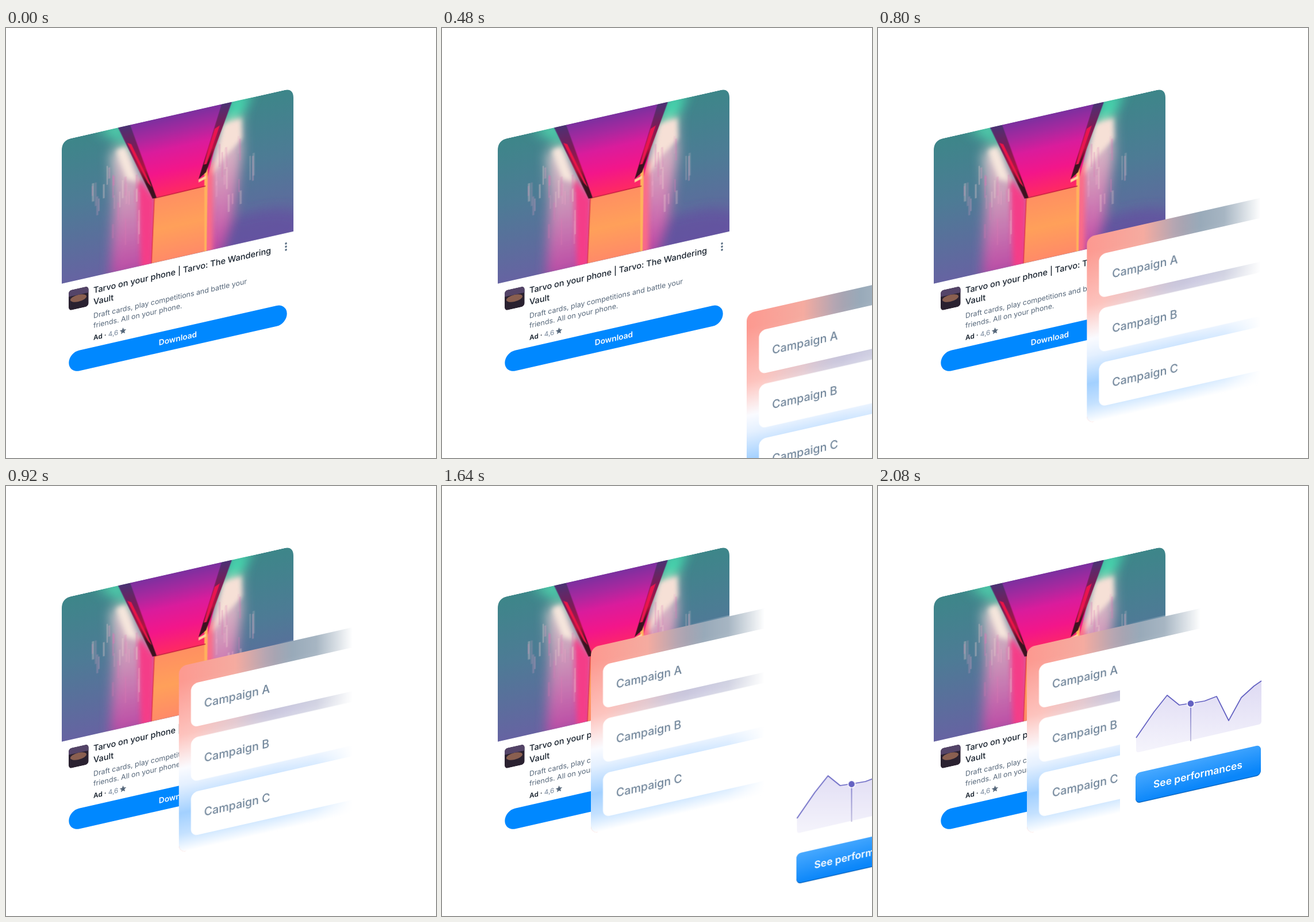
These frames come from a looping animation (748x748 px, 2600 ms). An HTML page:

```html
<!DOCTYPE html>
<html lang="en">
<head>
<meta charset="utf-8">
<title>Ad, campaigns, performance</title>
<style>
  html, body { margin: 0; width: 100%; height: 100%; overflow: hidden; background: #fff; }
  svg { display: block; width: 748px; height: 748px; }
  text { font-family: Inter, "Open Sans", sans-serif; }

  .slide { animation: 2600ms -3ms infinite; }
  .campaigns { animation-name: campaigns; }
  .report { animation-name: report; }

  /* Both layers glide in at constant speed, 25 positions per second */
  @keyframes campaigns {
    0% { transform: translate(900px, 715px); animation-timing-function: step-end; }
    3.0769% { transform: translate(480px, 381px); animation-timing-function: steps(23); }
    38.4615%, 100% { transform: translate(0, 0); }
  }
  @keyframes report {
    0% { transform: translate(900px, 750px); animation-timing-function: step-end; }
    50.7692% { transform: translate(291px, 242px); animation-timing-function: steps(19); }
    80%, 100% { transform: translate(0, 0); }
  }

  .title { font-size: 14.5px; font-weight: 500; fill: #16202c; }
  .copy { font-size: 12.4px; fill: #56677a; }
  .rating { font-size: 11.8px; fill: #74859a; }
  .cta { font-weight: 600; fill: #fff; text-anchor: middle; }
  .sheet { width: 328px; height: 324px; rx: 13px; }
  .row rect { width: 289px; height: 76px; rx: 12px; fill: #fff; }
  .row text { font-size: 19.6px; font-weight: 500; fill: #6f8499; }
</style>
</head>
<body>
<svg viewBox="0 0 748 748">
  <defs>
    <clipPath id="photoClip"><path d="M0 249.3V17Q0 0 17 0H386Q403 0 403 17V249.3Z"/></clipPath>
    <clipPath id="iconClip"><rect x="12" y="264" width="34.5" height="35" rx="5.5"/></clipPath>
    <filter id="soft" x="-50%" y="-50%" width="200%" height="200%"><feGaussianBlur stdDeviation="10"/></filter>
    <filter id="haze" x="-50%" y="-50%" width="200%" height="200%"><feGaussianBlur stdDeviation="4"/></filter>

    <linearGradient id="walls" x2="0" y2="1">
      <stop stop-color="#3d8689"/><stop offset=".45" stop-color="#4d7b95"/><stop offset="1" stop-color="#6663a2"/>
    </linearGradient>
    <linearGradient id="ceiling" x2="0" y2="1">
      <stop stop-color="#7c309f"/><stop offset=".22" stop-color="#aa289f"/>
      <stop offset=".42" stop-color="#da1c9c"/><stop offset=".7" stop-color="#f3168a"/><stop offset="1" stop-color="#ff2a62"/>
    </linearGradient>
    <linearGradient id="beam" x2="0" y2="1">
      <stop stop-color="#4b3274"/><stop offset=".3" stop-color="#7a1c58"/>
      <stop offset=".6" stop-color="#b01440"/><stop offset=".8" stop-color="#3c1220"/><stop offset="1" stop-color="#3c1220"/>
    </linearGradient>
    <linearGradient id="back" x2="0" y2="1">
      <stop stop-color="#ff8f62"/><stop offset=".5" stop-color="#ffa05a"/><stop offset="1" stop-color="#ff8a68"/>
    </linearGradient>
    <linearGradient id="glow" x2="0" y2="1">
      <stop stop-color="#ecdcd8"/><stop offset=".35" stop-color="#e2a6c2"/>
      <stop offset=".7" stop-color="#d870b2"/><stop offset="1" stop-color="#c842a4"/>
    </linearGradient>

    <linearGradient id="hues">
      <stop stop-color="#fd9990"/><stop offset=".3" stop-color="#f5aba0"/><stop offset=".46" stop-color="#b6a6b2"/>
      <stop offset=".6" stop-color="#8ea1b2"/><stop offset="1" stop-color="#8ea1b2"/>
    </linearGradient>
    <linearGradient id="veil" x2="0" y2="1">
      <stop offset=".08" stop-color="#fff" stop-opacity="0"/><stop offset=".37" stop-color="#fff" stop-opacity=".4"/>
      <stop offset=".55" stop-color="#fafbff"/><stop offset=".64" stop-color="#e4f0ff"/>
      <stop offset=".79" stop-color="#a2d0ff"/><stop offset=".9" stop-color="#c4e1ff"/><stop offset="1" stop-color="#fff"/>
    </linearGradient>
    <radialGradient id="violet" cx=".58" cy=".37" r=".5" gradientTransform="translate(0 .26) scale(1 .3)">
      <stop stop-color="#a9a4cc"/><stop offset="1" stop-color="#a9a4cc" stop-opacity="0"/>
    </radialGradient>
    <linearGradient id="fade">
      <stop offset=".5" stop-color="#fff" stop-opacity="0"/><stop offset=".72" stop-color="#fff" stop-opacity=".22"/>
      <stop offset=".91" stop-color="#fff"/>
    </linearGradient>

    <linearGradient id="area" x2="0" y2="1">
      <stop stop-color="#dedaf3"/><stop offset="1" stop-color="#f5f4fc"/>
    </linearGradient>
    <linearGradient id="stem" gradientUnits="userSpaceOnUse" x1="0" x2="0" y1="378" y2="444">
      <stop stop-color="#6462c2"/><stop offset="1" stop-color="#b3b0d6"/>
    </linearGradient>
    <linearGradient id="blue" x2=".25" y2="1">
      <stop stop-color="#48a9ff"/><stop offset="1" stop-color="#0a86fa"/>
    </linearGradient>
  </defs>

  <g transform="matrix(1 -.226 0 1 97 195.5)">
    <g clip-path="url(#photoClip)">
      <rect width="403" height="250" fill="url(#walls)"/>
      <g filter="url(#soft)">
        <path d="M58 -10H104L128 62 104 30Z" fill="#4fd0ac"/>
        <path d="M292 -10H332L290 84 262 90Z" fill="#46d3ac"/>
        <ellipse cx="335" cy="240" rx="90" ry="40" fill="#64489e" opacity=".6"/>
        <path d="M84 36 116 40 164 140V260H84L90 120Z" fill="url(#glow)" opacity=".85"/>
        <path d="M280 34 312 34 314 95 300 190 276 260H246V120Z" fill="url(#glow)" opacity=".9"/>
      </g>
      <g filter="url(#haze)">
        <path d="M94 38 111 36 134 104 112 92Z" fill="#f6e6dc"/>
        <path d="M282 36 312 32 313 68 284 92 262 120Z" fill="#f6e0d6"/>
        <path d="M132 94 162 137 158 255H138Z" fill="#f43c88"/>
        <path d="M250 110 264 92 262 255H248Z" fill="#ff6a86"/>
      </g>
      <g id="streaks"></g>
      <path d="M104 0H285L250 136H161Z" fill="url(#ceiling)"/>
      <path d="M161 137 250 136V250H156Z" fill="url(#back)"/>
      <path d="M248 106 254 102 252 250H248Z" fill="#ffb25c"/>
      <path d="M156 250 161 137" stroke="#e23a4e" stroke-width="1.6"/>
      <path d="M161 137 250 136" stroke="#c2183e" stroke-width="1.6"/>
      <path d="M98 0H119L165 137H158L141 98Z" fill="url(#beam)"/>
      <path d="M114 30 121 34 157 117 150 108Z" fill="#ea1448"/>
      <path d="M278 0H296L251 112 238 121Z" fill="url(#beam)"/>
      <path d="M266 40 275 36 252 98 247 98Z" fill="#ea1450"/>
      <path d="M238 122 251 118V123L238 127Z" fill="#ffd09a"/>
    </g>

    <g clip-path="url(#iconClip)">
      <rect x="12" y="264" width="35" height="35" fill="#2a2130"/>
      <rect x="12" y="264" width="35" height="11" fill="#544468"/>
      <ellipse cx="29" cy="281" rx="14" ry="6" fill="#8a5f50"/>
    </g>
    <g class="title">
      <text x="55" y="278.5">Tarvo on your phone | Tarvo: The Wandering</text>
      <text x="55" y="298.5">Vault</text>
    </g>
    <g class="copy">
      <text x="55" y="322">Draft cards, play competitions and battle your</text>
      <text x="55" y="339">friends. All on your phone.</text>
      <text class="rating" x="55" y="360"><tspan font-weight="600" fill="#16202c">Ad ·</tspan> 4,6</text>
    </g>
    <path transform="translate(106.5 355.6)" fill="#56677a"
      d="M0-6 1.6-2.2 5.7-1.85 2.6.8 3.5 4.85 0 2.7-3.5 4.85-2.6.8-5.7-1.85-1.6-2.2Z"/>
    <g fill="#5f7387">
      <circle cx="390" cy="267.5" r="1.8"/><circle cx="390" cy="273" r="1.8"/><circle cx="390" cy="278.5" r="1.8"/>
    </g>
    <rect x="12.3" y="372" width="379.4" height="35.7" rx="17.85" fill="#08f"/>
    <text class="cta" x="202" y="395" font-size="13.7">Download</text>
  </g>

  <g class="slide campaigns">
    <g transform="matrix(1 -.226 0 1 259 281)">
      <rect class="sheet" fill="url(#hues)"/>
      <rect class="sheet" fill="url(#violet)"/>
      <rect class="sheet" fill="url(#veil)"/>
      <rect y="-2" width="332" height="328" fill="url(#fade)"/>
      <g class="row" transform="translate(21 35)"><rect/><text x="23" y="46.5">Campaign A</text></g>
      <g class="row" transform="translate(21 129.5)"><rect/><text x="23" y="46.5">Campaign B</text></g>
      <g class="row" transform="translate(21 224)"><rect/><text x="23" y="46.5">Campaign C</text></g>
    </g>
  </g>

  <g class="slide report">
    <rect transform="matrix(1 -.226 0 1 421 338)" width="273" height="246" fill="#fff"/>
    <path d="M449 438 480 393 503 364 524 381 544 378 568 374 589 366 610 408 632 368 654 348 667 339V409Q667 414 662 415L454 463Q449 464 449 459Z" fill="url(#area)"/>
    <path d="M544 378V444" stroke="url(#stem)" stroke-width="1.5"/>
    <path d="M449 438 480 393 503 364 524 381 544 378 568 374 589 366 610 408 632 368 654 348 667 339"
      fill="none" stroke="#6462c2" stroke-width="1.7" stroke-linejoin="round"/>
    <circle cx="544" cy="378.5" r="6.2" fill="#6462c2" stroke="#fff" stroke-width="1.6"/>
    <g transform="matrix(1 -.226 0 1 448 499.5)">
      <rect y="1" width="218" height="52" rx="8" fill="#0b68c4"/>
      <rect width="218" height="51.5" rx="8" fill="url(#blue)"/>
      <text class="cta" x="108.5" y="33" font-size="17.4">See performances</text>
    </g>
  </g>
</svg>
<script>
  // Paint drips on both walls, from a seeded generator
  let seed = 11;
  const rand = (lo, hi) => {
    seed = (seed * 16807) % 2147483647;
    return lo + (hi - lo) * seed / 2147483647;
  };
  const tints = ["#ecd0d0", "#e8a4c4", "#dc78b4"];
  const drips = (count, x0, x1, y0, y1) => Array.from({ length: count }, () =>
    `<rect x="${rand(x0, x1)}" y="${rand(y0, y1)}" width="${rand(2, 4)}" height="${rand(16, 46)}"
      fill="${tints[Math.floor(rand(0, 3))]}" opacity="${rand(.2, .45)}"/>`).join("");
  document.getElementById("streaks").innerHTML =
    drips(9, 52, 90, 60, 130) + drips(16, 78, 136, 60, 170) + drips(14, 262, 318, 60, 160) + drips(3, 314, 332, 80, 105);
</script>
</body>
</html>
```
